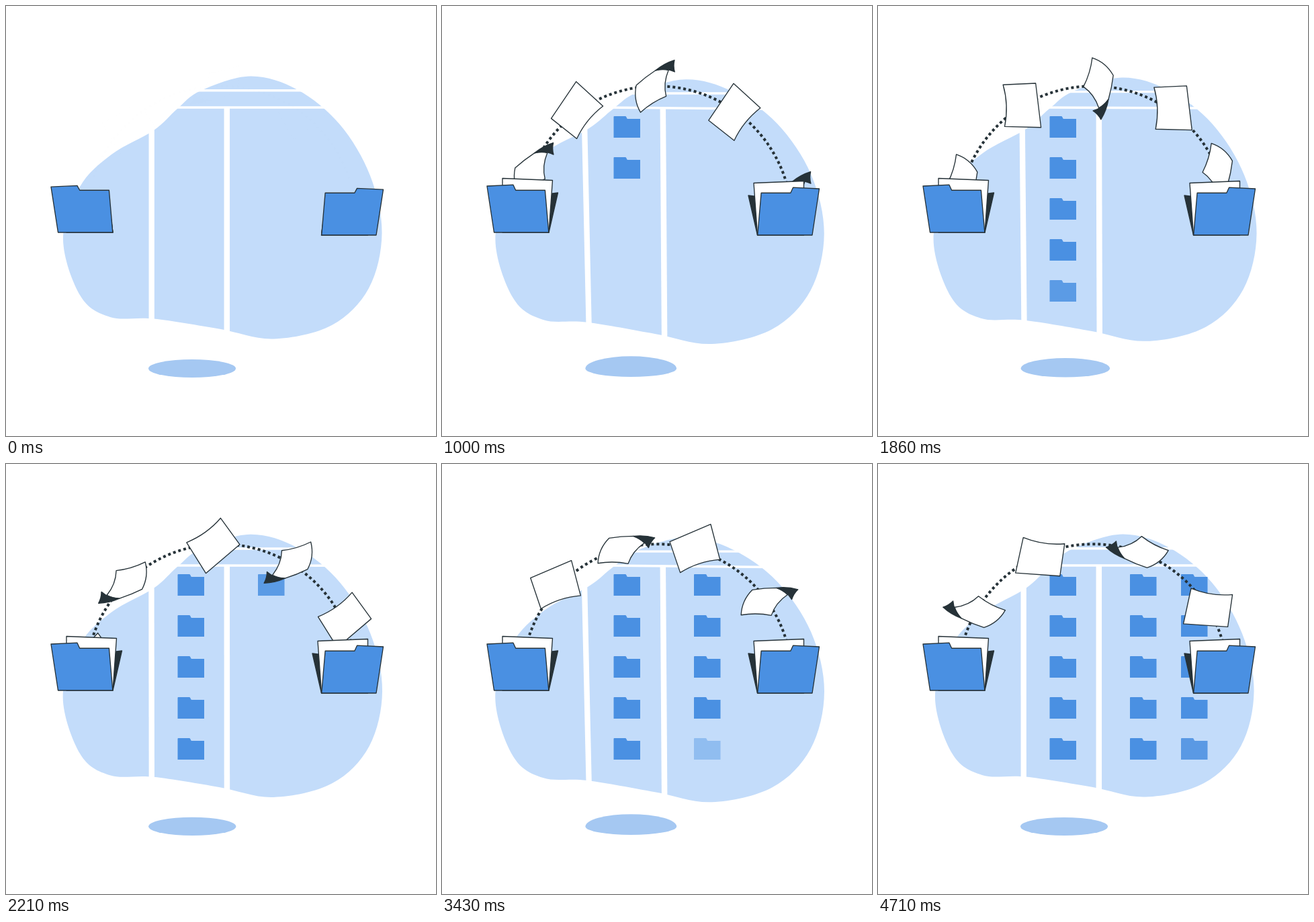
Recreate the animation shown at these times as an HTML page with a canvas. Size 640x640 px, loop 4.78 s.

```html
<!DOCTYPE html>
<html>
<head>
<meta charset="utf-8">
<style>
html, body { margin: 0; overflow: hidden; background: #fff; }
canvas { display: block; width: 640px; height: 640px; }
</style>
</head>
<body>
<canvas id="stage" width="640" height="640"></canvas>
<script>
const ctx = document.getElementById('stage').getContext('2d');
const LOOP = 4780;
const DARK = '#263238', BLUE = '#4a90e2', PALE = '#c3dcfa', SHADE = '#a5c8f2';
const RAD = Math.PI / 180;
const CENTER = 320, RADIUS = 200.8; // arc the sheets fly along

// Key points of the cloud at rest, joined by a smooth closed curve
const CLOUD = [
  [364, 104.5], [434, 124.7], [497, 176.5], [542, 252.6], [559.5, 338], [540, 420],
  [485, 475], [398, 495.5], [317, 480.5], [220, 465.5], [155, 463], [110.8, 431.6],
  [85, 347], [110, 269], [157, 221], [220, 185], [255, 153], [290, 126]
];

// When each sheet passes the top of the arc; flat and curled ones alternate
const PASSES = [-436, 17, 554, 1018, 1431, 1827, 2267, 2765, 3214, 3609, 4006, 4466, 5002, 5451];
const SPEED = 0.0814, SPIN = 0.1617; // degrees per ms

const flat = new Path2D('M-33.4-28.5L32.8-28.3L24.8 25.2Q-6 15-37.2 19.9Z');
const curl = new Path2D('M-13.5-22.3Q4-18 21-10.8Q29-3 32 5Q11 9-2.3 23.8Q-21 11-43.4 5.5Q-34-14-13.5-22.3Z');
const curlBack = new Path2D('M21-10.8Q37-6 49.3 4Q41 7 35 14Q33-1 21-10.8Z');
const icon = new Path2D('M0 1Q0 0 1 0H17.5Q18.6 0 19 1.5Q19.6 4 21 4H39.5V32H0Z');

const clamp = x => Math.max(0, Math.min(1, x));
const smooth = x => (x = clamp(x), x * x * (3 - 2 * x));
const mix = (a, b, k) => a + (b - a) * k;

function paint(path, fill) {
  ctx.fillStyle = fill;
  ctx.strokeStyle = DARK;
  ctx.lineWidth = 1.35;
  ctx.fill(path);
  ctx.stroke(path);
}

function polygon(points, fill) {
  const path = new Path2D();
  points.forEach(p => path.lineTo(...p));
  path.closePath();
  paint(path, fill);
}

function bar(width, x1, y1, x2, y2) {
  ctx.lineWidth = width;
  ctx.beginPath();
  ctx.moveTo(x1, y1);
  ctx.lineTo(x2, y2);
  ctx.stroke();
}

// Pushes a point away from the middle, while the top right sinks in
function swell([x, y], k) {
  const dx = x - CENTER, dy = y - CENTER, r = Math.hypot(dx, dy);
  const top = Math.max(0, (0.25 * dx - 0.97 * dy) / r);
  const push = k * (8 + 2 * dx / r - 13.5 * top ** 3);
  return [x + push * dx / r, y + push * dy / r];
}

function smoothLoop(points) {
  const n = points.length;
  const at = i => points[(i + n) % n];
  const handle = (i, side) => at(i).map((v, c) => v + side * (at(i + 1)[c] - at(i - 1)[c]) / 6);
  ctx.beginPath();
  ctx.moveTo(...at(0));
  for (let i = 0; i < n; i++) ctx.bezierCurveTo(...handle(i, 1), ...handle(i + 1, -1), ...at(i + 1));
}

function drawCloud(k) {
  smoothLoop(CLOUD.map(p => swell(p, k)));
  ctx.fillStyle = PALE;
  ctx.fill();

  ctx.strokeStyle = '#fff';
  bar(8.3, 216.7 - 5 * k, 174, 216.7 + 2.3 * k, 486);
  bar(8.5, 328.8, 151, 328.8 + 2.5 * k, 500);
  bar(3.4, 270, 125.7 + 4.6 * k, 456, 125.7 + 4.6 * k);
  bar(3.5, 240, 151, 490, 151 + 2.5 * k);

  const cx = 277 + 4.5 * k, rx = 65 + 3 * k;
  ctx.beginPath();
  ctx.ellipse(cx, 539.5, rx, 13.5 + 5 * k, 0, Math.PI, 2 * Math.PI);
  ctx.ellipse(cx, 539.5, rx, 13.5 - k, 0, 0, Math.PI);
  ctx.fillStyle = SHADE;
  ctx.fill();
}

function iconColumn(t, x, start, gap) {
  ctx.fillStyle = BLUE;
  for (let row = 0; row < 5; row++) {
    ctx.save();
    ctx.globalAlpha = clamp((t - start - row * gap) / 200);
    ctx.translate(x, 164 + row * 61);
    ctx.fill(icon);
    ctx.restore();
  }
}

function drawFlight(t) {
  ctx.save();
  ctx.globalAlpha = clamp(t / 350);
  ctx.beginPath();
  ctx.rect(0, 0, 640, 335);
  ctx.clip();

  ctx.strokeStyle = DARK;
  ctx.lineWidth = 4;
  ctx.setLineDash([4, 4]);
  ctx.beginPath();
  ctx.arc(CENTER, CENTER, RADIUS, -161 * RAD, -17 * RAD);
  ctx.stroke();
  ctx.setLineDash([]);

  PASSES.forEach((pass, i) => {
    const angle = (t - pass) * SPEED;
    if (Math.abs(angle) > 88) return;
    ctx.save();
    ctx.translate(CENTER + RADIUS * Math.sin(angle * RAD), CENTER - RADIUS * Math.cos(angle * RAD));
    ctx.rotate((142 + t * SPIN) * RAD);
    if (i % 2) {
      paint(curl, '#fff');
      paint(curlBack, DARK);
    } else {
      paint(flat, '#fff');
    }
    ctx.restore();
  });
  ctx.restore();
}

function drawFolder(open) {
  if (open > 0) {
    const right = [mix(152, 164.5, open), mix(282, 259.5, open)];
    polygon([[140, 282], [mix(152, 172.5, open), mix(284, 278, open)], [159, 337]], DARK);
    polygon([[90, mix(280, 256.5, open)], right, [159, 337], [90, 337]], '#fff');
  }
  const lift = 1.2 * open;
  polygon([[67, 269.2 - lift], [106, 267.4 - lift], [109.7, 274.2], [153.4, 274.2], [158.8, 337], [77.5, 337]], BLUE);
}

function render(t) {
  ctx.fillStyle = '#fff';
  ctx.fillRect(0, 0, 640, 640);
  drawCloud((1 - Math.cos(4 * Math.PI * t / LOOP)) / 2);
  iconColumn(t, 255.5, 450, 310);
  iconColumn(t, 375, 2040, 327);
  iconColumn(t, 451, 3650, 222);
  drawFlight(t);
  drawFolder(smooth(t / 560));
  ctx.save();
  ctx.translate(628.5, 4);
  ctx.scale(-1, 1);
  drawFolder(smooth(t / 650));
  ctx.restore();
}

ctx.lineJoin = 'round';
const begin = performance.now();
function tick() {
  render((performance.now() - begin) % LOOP);
  requestAnimationFrame(tick);
}
tick();
</script>
</body>
</html>
```
